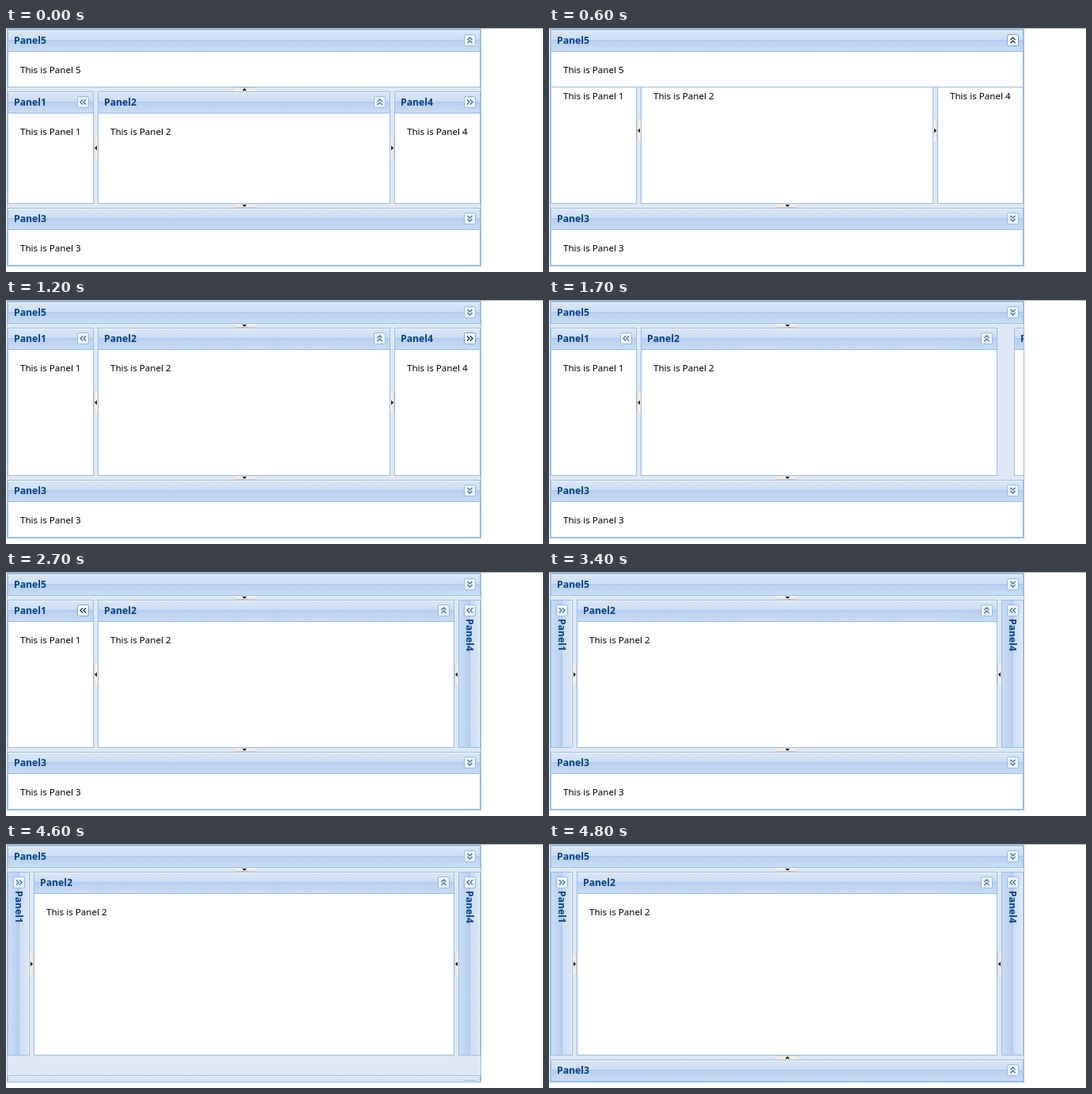
An HTML page with a canvas for the animation above (5800 ms loop, 679x308 px).

```html
<!DOCTYPE html>
<html lang="en">
<head>
<meta charset="utf-8">
<title>Collapsing panels</title>
<style>
  html, body { margin: 0; width: 100%; height: 100%; overflow: hidden; background: #fff; }
  canvas { display: block; }
</style>
</head>
<body>
<canvas id="stage" width="679" height="308"></canvas>
<script>
const ctx = document.getElementById('stage').getContext('2d');

const LOOP = 5800, STEP = 100, STEPS = 4;
const OUT_TIME = 250, IN_TIME = 160, LAG = 33;
const BOX = { x: 2, y: 2, r: 600, b: 300 };
const BAR = 28, GAP = 5, SIDE = 109, EDGE = 73;
const START = { north: 600, east: 1500, west: 3000, south: 4400 };
const BORDER = '#99bce8', BACK = '#dfe8f6', TITLE = '#04408c';
const FACE = '"Noto Sans", "Open Sans", sans-serif';
const TURN = { up: 0, right: 1, down: 2, left: 3 };
const OPPOSITE = { up: 'down', down: 'up', left: 'right', right: 'left' };

const easeOut = t => 1 - (1 - t) * (1 - t);
const clamp = t => Math.max(0, Math.min(1, t));

function rect(x, y, w, h, fill) {
  ctx.fillStyle = fill;
  ctx.fillRect(x, y, w, h);
}

function frame(x, y, w, h, color) {
  ctx.strokeStyle = color;
  ctx.lineWidth = 1;
  ctx.strokeRect(x + 0.5, y + 0.5, w - 1, h - 1);
}

function text(str, x, y, font, color) {
  ctx.font = font + ' ' + FACE;
  ctx.fillStyle = color;
  ctx.fillText(str, x, y);
}

function at(x, y, dir, draw) {
  ctx.save();
  ctx.translate(x, y);
  ctx.rotate(TURN[dir] * Math.PI / 2);
  draw();
  ctx.restore();
}

function glossy(x0, y0, x1, y1) {
  const g = ctx.createLinearGradient(x0, y0, x1, y1);
  g.addColorStop(0, '#dae7f6');
  g.addColorStop(0.45, '#cddef3');
  g.addColorStop(0.46, '#abc7ec');
  g.addColorStop(0.5, '#abc7ec');
  g.addColorStop(0.51, '#b8cfee');
  g.addColorStop(1, '#cbddf3');
  return g;
}

// Small square button with a double chevron
function tool(x, y, dir, hover) {
  ctx.beginPath();
  ctx.roundRect(x + 0.5, y + 0.5, 14, 14, 2);
  ctx.fillStyle = hover ? '#ffffff' : '#edf4fc';
  ctx.fill();
  ctx.lineWidth = 1;
  ctx.strokeStyle = hover ? '#6f9fd8' : '#92b8e6';
  ctx.stroke();
  at(x + 7.5, y + 7.5, dir, () => {
    ctx.beginPath();
    for (const dy of [-0.5, 3.5]) {
      ctx.moveTo(-3, dy);
      ctx.lineTo(0, dy - 3);
      ctx.lineTo(3, dy);
    }
    ctx.lineWidth = 1.4;
    ctx.strokeStyle = hover ? '#0b2f66' : '#3d73b5';
    ctx.stroke();
  });
}

function header(x, y, w, name, dir, hover) {
  rect(x, y, w, BAR, glossy(0, y + 1, 0, y + BAR - 1));
  rect(x + 1, y + 1, w - 2, 1, '#f0f6fd');
  frame(x, y, w, BAR, BORDER);
  text(name, x + 8, y + 18, 'bold 12.2px', TITLE);
  tool(x + w - 21, y + 6, dir, hover);
}

function panel(x, y, w, h, num, dir, hover) {
  rect(x, y, w, h, '#fff');
  header(x, y, w, 'Panel' + num, dir, hover);
  frame(x, y, w, h, BORDER);
  text('This is Panel ' + num, x + 16, y + 55, '11.6px', '#000');
}

function sideBar(x, y, h, name, dir) {
  rect(x, y, BAR, h, glossy(x + BAR - 1, 0, x + 1, 0));
  rect(x + BAR - 2, y + 1, 1, h - 2, '#f0f6fd');
  frame(x, y, BAR, h, BORDER);
  tool(x + 7, y + 6, dir, false);
  at(x + 10, y + 24, 'right', () => text(name, 0, 0, 'bold 12.2px', TITLE));
}

// Grip in the gap between two regions
function grip(x, y, dir) {
  at(x, y, dir, () => {
    ctx.beginPath();
    ctx.moveTo(-17, 2.5);
    ctx.lineTo(-12.5, -2);
    ctx.lineTo(12.5, -2);
    ctx.lineTo(17, 2.5);
    ctx.fillStyle = '#f1eee7';
    ctx.fill();
    ctx.lineWidth = 1;
    ctx.strokeStyle = '#d3d1cc';
    ctx.stroke();
    for (let i = 0; i < 3; i++) rect(-0.5 - i, i - 1.5, 1 + 2 * i, 1, '#222');
  });
}

function stateOf(side, time) {
  const k = Math.floor((time - START[side]) / STEP);
  const age = k * STEP - LAG;
  return {
    begun: k >= 0,
    moving: k >= 0 && k < STEPS,
    closed: k >= STEPS,
    out: easeOut(clamp(age / OUT_TIME)),
    back: k >= STEPS ? 1 : easeOut(clamp((age - OUT_TIME) / IN_TIME))
  };
}

// Slides the open region away, then brings in its collapsed bar
function region(s, size, dx, dy, open, bar) {
  const showBar = s.back > 0;
  const shift = showBar ? BAR - Math.floor(BAR * s.back) : Math.round(size * s.out);
  ctx.save();
  ctx.translate(dx * shift, dy * shift);
  (showBar ? bar : open)();
  ctx.restore();
}

function draw(time) {
  const n = stateOf('north', time), e = stateOf('east', time);
  const w = stateOf('west', time), s = stateOf('south', time);
  const full = BOX.r - BOX.x;
  const span = (st, size) => (st.begun ? BAR : size) + GAP;
  const top = BOX.y + span(n, EDGE), bottom = BOX.b - span(s, EDGE);
  const left = BOX.x + span(w, SIDE), right = BOX.r - span(e, SIDE);
  const tall = bottom - top;
  const over5 = time >= 400 && time < 1200;
  const over4 = time >= 1200 && !e.closed;
  const over1 = time >= 2700 && !w.closed;

  rect(0, 0, 679, 308, '#fff');
  rect(0, 0, 679, 1, '#b3b3b3');
  rect(1, 1, 600, 300, BACK);
  frame(1, 1, 600, 300, BORDER);

  ctx.save();
  ctx.beginPath();
  ctx.rect(BOX.x, BOX.y, full, BOX.b - BOX.y);
  ctx.clip();

  const midX = 301.5, midY = Math.ceil((top + bottom) / 2) + 0.5;
  const half = GAP / 2;
  const split = (st, x, y, dir) => {
    if (!st.moving) grip(x, y, st.closed ? OPPOSITE[dir] : dir);
  };
  split(n, midX, top - half, 'up');
  split(s, midX, bottom + half, 'down');
  split(w, left - half, midY, 'left');
  split(e, right + half, midY, 'right');

  panel(left, top, right - left, tall, 2, 'up', false);

  region(w, SIDE, -1, 0,
    () => panel(BOX.x, top, SIDE, tall, 1, 'left', over1),
    () => sideBar(BOX.x, top, tall, 'Panel1', 'right'));
  region(e, SIDE, 1, 0,
    () => panel(BOX.r - SIDE, top, SIDE, tall, 4, 'right', over4),
    () => sideBar(BOX.r - BAR, top, tall, 'Panel4', 'left'));
  region(n, EDGE, 0, -1,
    () => panel(BOX.x, BOX.y, full, EDGE, 5, 'up', over5),
    () => header(BOX.x, BOX.y, full, 'Panel5', 'down', over5));
  region(s, EDGE, 0, 1,
    () => panel(BOX.x, BOX.b - EDGE, full, EDGE, 3, 'down', false),
    () => header(BOX.x, BOX.b - BAR, full, 'Panel3', 'up', false));

  ctx.restore();
}

function tick() {
  draw(performance.now() % LOOP);
  requestAnimationFrame(tick);
}
tick();
</script>
</body>
</html>
```
